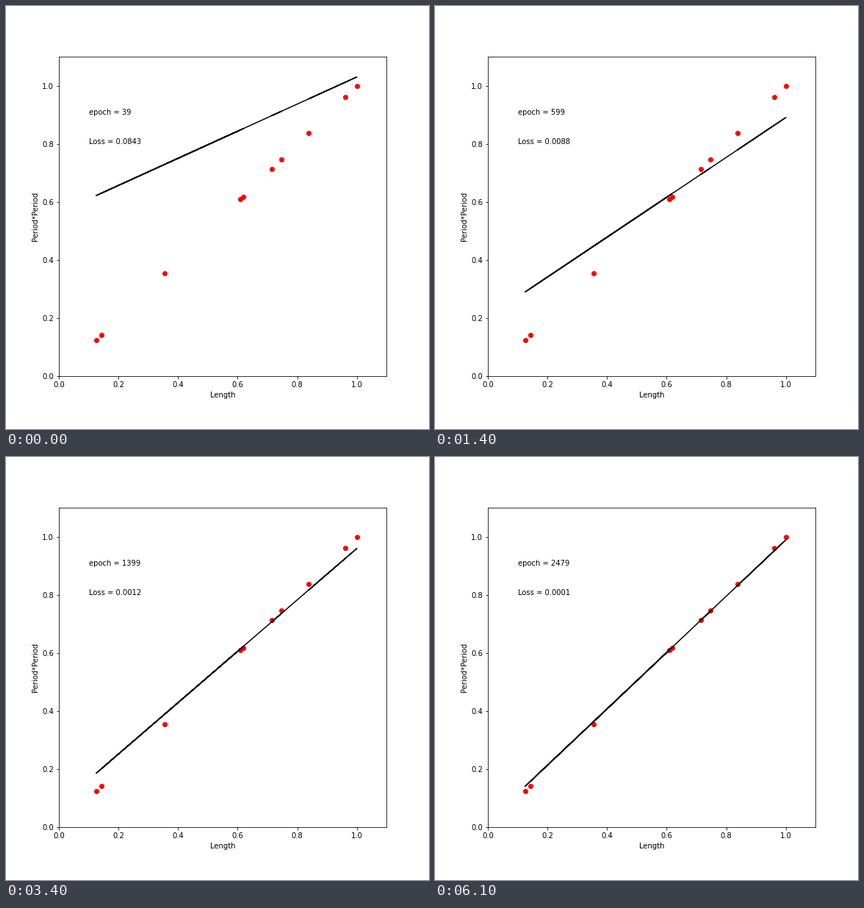
Write a matplotlib script that moves like this. It is 576 px wide and 576 px high and loops after 6.2 s.

```python
import numpy as np
import matplotlib.pyplot as plt
from matplotlib.animation import FuncAnimation

FRAMES = 62
EPOCHS_PER_FRAME = 40
RATE = 0.01

# Normalised pendulum lengths in measuring order; period squared is proportional
length = np.array([0.3545, 0.618, 0.125, 0.609, 0.142,
                   0.7465, 0.714, 1.0, 0.8375, 0.961])
period_sq = length.copy()


def train(slope=0.6431, offset=0.9048):
    """Fit a line by gradient descent, keeping one snapshot per frame."""
    history = []
    for epoch in range(FRAMES * EPOCHS_PER_FRAME):
        error = slope * length + offset - period_sq
        loss = np.mean(error ** 2)
        slope -= RATE * 2 * np.mean(error * length)
        offset -= RATE * 2 * np.mean(error)
        if (epoch + 1) % EPOCHS_PER_FRAME == 0:
            history.append((epoch, loss, slope, offset))
    return history


history = train()

plt.rcParams["font.family"] = "DejaVu Sans"
fig, ax = plt.subplots(figsize=(8, 8), dpi=72)
fig.subplots_adjust(left=0.125, right=0.9, bottom=0.125, top=0.88)
ax.set(xlim=(0, 1.1), ylim=(0, 1.1), xlabel="Length", ylabel="Period*Period")

ax.scatter(length, period_sq, color="red")
fit_line, = ax.plot([], [], color="black", lw=1.5)
epoch_text = ax.text(0.1, 0.9, "")
loss_text = ax.text(0.1, 0.8, "")


def update(frame):
    epoch, loss, slope, offset = history[frame]
    fit_line.set_data(length, slope * length + offset)
    epoch_text.set_text(f"epoch = {epoch}")
    loss_text.set_text(f"Loss = {loss:.4f}")
    return fit_line, epoch_text, loss_text


anim = FuncAnimation(fig, update, frames=FRAMES, interval=100,
                     repeat=True, repeat_delay=0)
plt.show()
```
